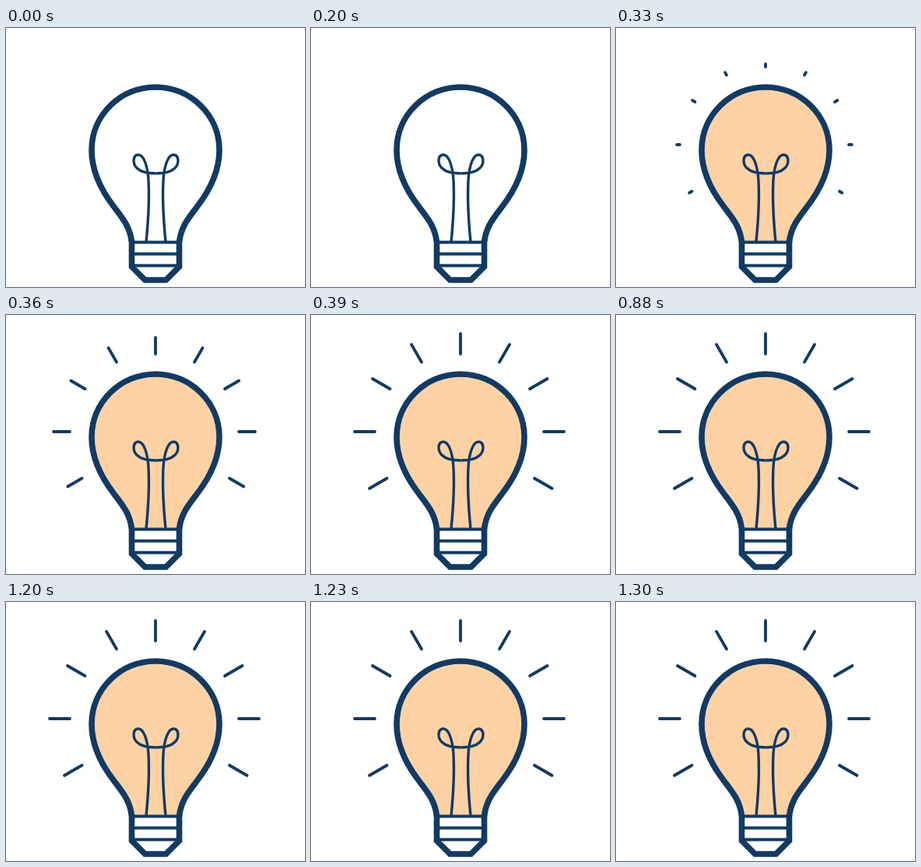
An HTML page that plays this animation: 384 px wide and 333 px high, repeating every 1350 ms.

```html
<!DOCTYPE html>
<html lang="en">
<head>
<meta charset="utf-8">
<title>Light bulb</title>
<style>
  html, body { margin: 0; width: 100%; height: 100%; overflow: hidden; background: #fff; }
  svg { display: block; width: 100%; height: 100%; }
  .ink { fill: none; stroke: #123a63; }
</style>
</head>
<body>
<svg viewBox="0 0 384 333">
  <path id="glass" class="ink" stroke-width="7.6" d="M161.5 275
    C159 255 150 245 138 229 C125 212 110 188 110 157
    C110 112 147 76 192 76 C237 76 274 112 274 157
    C274 188 259 212 246 229 C234 245 225 255 222.5 275"/>
  <path fill="#fff" class="ink" stroke-width="7.6"
    d="M161.5 273V307L178.5 324H205.5L222.5 307V273"/>
  <path class="ink" stroke-width="4" d="M161 275.5H223M161 290.5H223M161 305.5H223"/>
  <g class="ink" stroke-width="3.4">
    <path id="wire" d="M180 275 C183 245 184 215 183 196
      C182 178 177 163 170 163 C163 163 162 174 168 180 C173 185 183 187 192.5 187"/>
    <use href="#wire" transform="matrix(-1 0 0 1 385 0)"/>
  </g>
  <g id="rays" class="ink" stroke-width="3.8" stroke-linecap="round"></g>
</svg>
<script>
const LOOP = 1350, TICK = 30, ON = 330;
const GROW_START = 297, GROW_TIME = 99;

// inner x, inner y, outer x, outer y
const RAYS = [
  [192, 50, 192, 24],
  [142, 60.5, 129, 38], [242, 60.5, 255, 38],
  [101.5, 95, 79, 82], [281, 95, 303.5, 82],
  [82, 150, 56, 150], [299, 150, 325, 150],
  [97.5, 210, 75, 223], [287, 210, 309.5, 223]
];

const glass = document.getElementById("glass");
const rayGroup = document.getElementById("rays");
const lines = RAYS.map(() => {
  const line = document.createElementNS("http://www.w3.org/2000/svg", "line");
  return rayGroup.appendChild(line);
});

const mix = (a, b, p) => a + (b - a) * p;
const easeInOut = x => x < 0.5 ? 4 * x ** 3 : 1 - 4 * (1 - x) ** 3;

function draw(now) {
  const t = Math.floor((now % LOOP) / TICK) * TICK;
  const lit = t >= ON;
  const p = easeInOut(Math.min(1, Math.max(0, (t - GROW_START) / GROW_TIME)));

  glass.style.fill = lit ? "#ffd2a6" : "none";
  rayGroup.style.display = lit ? "" : "none";
  RAYS.forEach(([x1, y1, x2, y2], i) => {
    const ends = { x1, y1, x2: mix(x1, x2, p), y2: mix(y1, y2, p) };
    for (const key in ends) lines[i].setAttribute(key, ends[key]);
  });
}

const start = performance.now();
function loop() {
  draw(performance.now() - start);
  requestAnimationFrame(loop);
}
loop();
</script>
</body>
</html>
```
